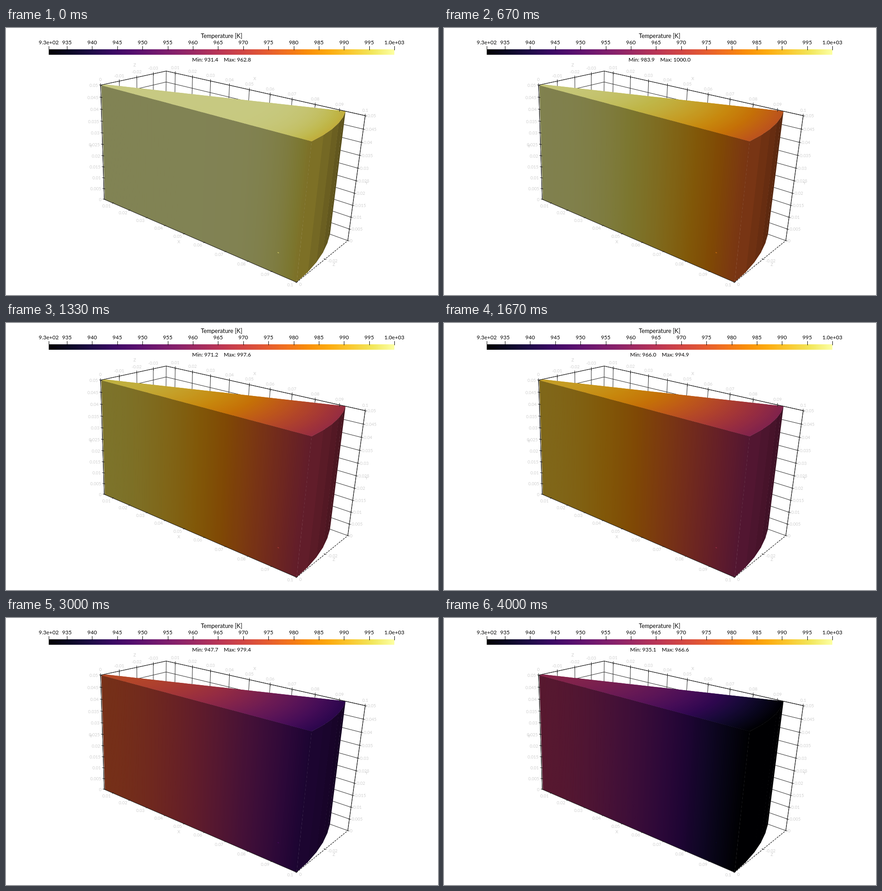
An HTML page with a canvas that plays this animation: 950x589 px, repeating every 4.33 s.

```html
<!DOCTYPE html>
<html lang="en">
<head>
<meta charset="utf-8">
<title>Cooling wedge</title>
<style>
  html, body { margin: 0; width: 100%; height: 100%; overflow: hidden; background: #fff; }
  canvas { display: block; }
</style>
</head>
<body>
<canvas id="stage" width="950" height="589"></canvas>
<script>
const ctx = document.getElementById('stage').getContext('2d');
const LOOP = 4330, STEPS = 13;
const T_MIN = 931.4, T_MAX = 1000;

// Coldest (rim) and hottest (tip) temperature of each step.
const RIM = [994, 983.9, 976.9, 971.2, 966, 961.2, 956.6, 952.1, 947.7, 943.5, 939.2, 935.1, 931.4];
const TIP = [1000, 1000, 999.3, 997.6, 994.9, 991.5, 987.7, 983.6, 979.4, 975.2, 970.9, 966.6, 962.8];

const INFERNO = ('000004 0c0826 1f0c48 3b0964 57106e 71196e 89226a a32c60 bc3754 ' +
  'd14644 e35933 f1711f f98e09 fcac11 f9c932 f2e75c fcffa4').split(' ')
  .map(h => [0, 2, 4].map(i => parseInt(h.substr(i, 2), 16)));

function heat(temp, shade = 1) {
  const last = INFERNO.length - 1;
  const u = Math.max(0, Math.min(1, (temp - T_MIN) / (T_MAX - T_MIN))) * last;
  const i = Math.min(last - 1, Math.floor(u));
  const rgb = INFERNO[i].map((v, n) => Math.round((v + (INFERNO[i + 1][n] - v) * (u - i)) * shade));
  return `rgb(${rgb})`;
}

// Wedge dimensions in metres.
const R0 = 0.005, R = 0.1, H = 0.05, ANGLE = Math.PI / 8, FACETS = 5;
const X0 = 0.0046, DEPTH = R * Math.sin(ANGLE);

// Perspective projection; z is the distance towards the back.
function project(x, y, z) {
  const u = (x - X0) / (R - X0), v = y / H, d = z / DEPTH;
  const w = 1 - 0.2187 * u - 0.0728 * v + 0.115 * d;
  return [
    (216 + 283.25 * u - 23.14 * v + 174.4 * d) / w,
    (378 + 60.3 * u - 261.17 * v - 17.9 * d) / w
  ];
}
const polar = (r, a, y) => project(r * Math.cos(a), y, r * Math.sin(a));

function poly(points, fill) {
  ctx.beginPath();
  points.forEach(p => ctx.lineTo(p[0], p[1]));
  ctx.closePath();
  ctx.fillStyle = fill;
  ctx.fill();
}

function line(a, b, width = 1, color = '#222') {
  ctx.beginPath();
  ctx.moveTo(a[0], a[1]);
  ctx.lineTo(b[0], b[1]);
  ctx.lineWidth = width;
  ctx.strokeStyle = color;
  ctx.stroke();
}

function text(str, x, y, size, color = '#000', align = 'center') {
  ctx.font = `${size}px Lato, sans-serif`;
  ctx.textAlign = align;
  ctx.fillStyle = color;
  ctx.fillText(str, x, y + size * 0.36);
}
const label = (str, x, y, align) => text(str, x, y, 9.4, '#cfcfcf', align);

const range = (n, f) => Array.from({ length: n }, (_, i) => f(i));
const xs = range(10, i => (i + 1) / 100);
const ys = range(11, i => i / 200);
const zs = [0, 0.01, 0.02, 0.03];

function drawBar(shown) {
  const left = 94, width = 760;
  for (let x = 0; x < width; x++) {
    ctx.fillStyle = heat(T_MIN + (T_MAX - T_MIN) * x / (width - 1));
    ctx.fillRect(left + x, 47, 1, 12);
  }
  const mark = (str, x) => {
    text(str, x, 31.5, 12);
    const px = Math.round(x) + 0.5;
    line([px, 40], [px, 49], 1, '#000');
  };
  mark('9.3e+02', 94);
  mark('1.0e+03', 854);
  for (let t = 935; t < 1000; t += 5) mark(String(t), 134 + (t - 935) * 11.08);
  text('Temperature [K]', 474, 17, 12.9);
  text(`Min: ${RIM[shown].toFixed(1)}    Max: ${TIP[shown].toFixed(1)}`, 474, 70, 12);
}

function drawGrid() {
  for (const x of xs) line(project(x, 0, DEPTH), project(x, H, DEPTH));
  for (const z of zs) line(project(X0, 0, z), project(X0, H, z));
  line(project(X0, 0, DEPTH), project(X0, H, DEPTH));
  for (const y of ys) {
    line(project(X0, y, DEPTH), project(R, y, DEPTH));
    line(project(X0, y, 0), project(X0, y, DEPTH));
  }
}

function drawWedge(step) {
  const drop = TIP[step] - RIM[step];
  // Constant heat flux keeps the slope at the rim fixed.
  const power = 64 / drop;
  const temp = r => TIP[step] - drop * Math.pow(r / R, power);
  const bands = 150;
  const radius = i => R0 + (R - R0) * Math.min(1, i / bands);
  const arc = (r, y) => range(FACETS + 1, i => polar(r, ANGLE * i / FACETS, y));

  for (let i = FACETS - 1; i >= 0; i--) {
    const a = ANGLE * i / FACETS, b = ANGLE * Math.min(FACETS, i + 1.05) / FACETS;
    poly([polar(R, a, 0), polar(R, a, H), polar(R, b, H), polar(R, b, 0)],
      heat(RIM[step], 0.51 - 0.037 * i));
  }
  // Each band reaches under the next one so that no seams show.
  for (let i = 0; i < bands; i++) {
    const a = radius(i), b = radius(i + 2), t = temp(radius(i + 0.5));
    poly([project(a, 0, 0), project(a, H, 0), project(b, H, 0), project(b, 0, 0)], heat(t, 0.512));
    poly([...arc(a, H), ...arc(b, H).reverse()], heat(t, 0.79));
  }
  ctx.beginPath();
  ctx.ellipse(598.7, 495.6, 1.9, 0.9, 0.3, 0, 7);
  ctx.fillStyle = heat(temp(0.0925), 0.8);
  ctx.fill();
}

function tick(p, dx, dy) {
  line([p[0] - dx, p[1] - dy], [p[0] + dx, p[1] + dy]);
}

function drawAxes() {
  const A = project(X0, H, 0), C = project(R, H, DEPTH), D = project(X0, H, DEPTH);
  const E = project(X0, 0, 0), F = project(R, 0, 0), G = project(R, 0, DEPTH);
  for (const [a, b] of [[A, D], [D, C], [C, G], [A, E], [E, F]]) line(a, b, 1.1);
  ctx.setLineDash([4, 2]);
  line(F, G, 1.2);
  ctx.setLineDash([]);

  for (const x of xs) {
    const name = String(x);
    const back = project(x, H, DEPTH), front = project(x, 0, 0);
    tick(back, 0, 4);
    label(name, back[0], back[1] - 12);
    tick(front, 2, -1);
    label(name, front[0] - 14, front[1] + 6);
  }
  for (const y of ys) {
    const name = String(y);
    const left = project(X0, y, 0), right = project(R, y, DEPTH);
    tick(left, 3, 0.6);
    label(name, left[0] - 6, left[1] + 0.5, 'right');
    tick(right, 3.5, 0.9);
    label(name, right[0] + 5, right[1] + 0.5, 'left');
  }
  for (const z of zs) {
    const p = project(X0, H, z);
    tick(p, 0, 4);
    label(z ? String(-z) : '0', p[0] - 0.5, p[1] - 12);
  }
  tick(project(R, 0, 0.02), 3, 1);
  label('-0.02', 718, 514);
  label('0', 647.5, 566);
  label('Z', 721, 522);
  label('Z', 283, 82);
  label('X', 547, 112);
  label('X', 380, 472);
  label('Y', 187, 261);
  label('Y', 793, 342);
}

function draw(step) {
  ctx.fillStyle = '#fff';
  ctx.fillRect(0, 0, 950, 589);
  drawGrid();
  drawWedge(step);
  drawAxes();
  // The readout trails the picture by one step.
  drawBar((step + STEPS - 1) % STEPS);
}

const startOf = k => Math.round(k * 100 / 3) * 10;
const origin = performance.now();
let current = -1;

function tickFrame() {
  const t = (performance.now() - origin) % LOOP;
  let step = STEPS - 1;
  while (step > 0 && startOf(step) > t) step--;
  if (step !== current) draw(current = step);
  requestAnimationFrame(tickFrame);
}
tickFrame();
</script>
</body>
</html>
```
